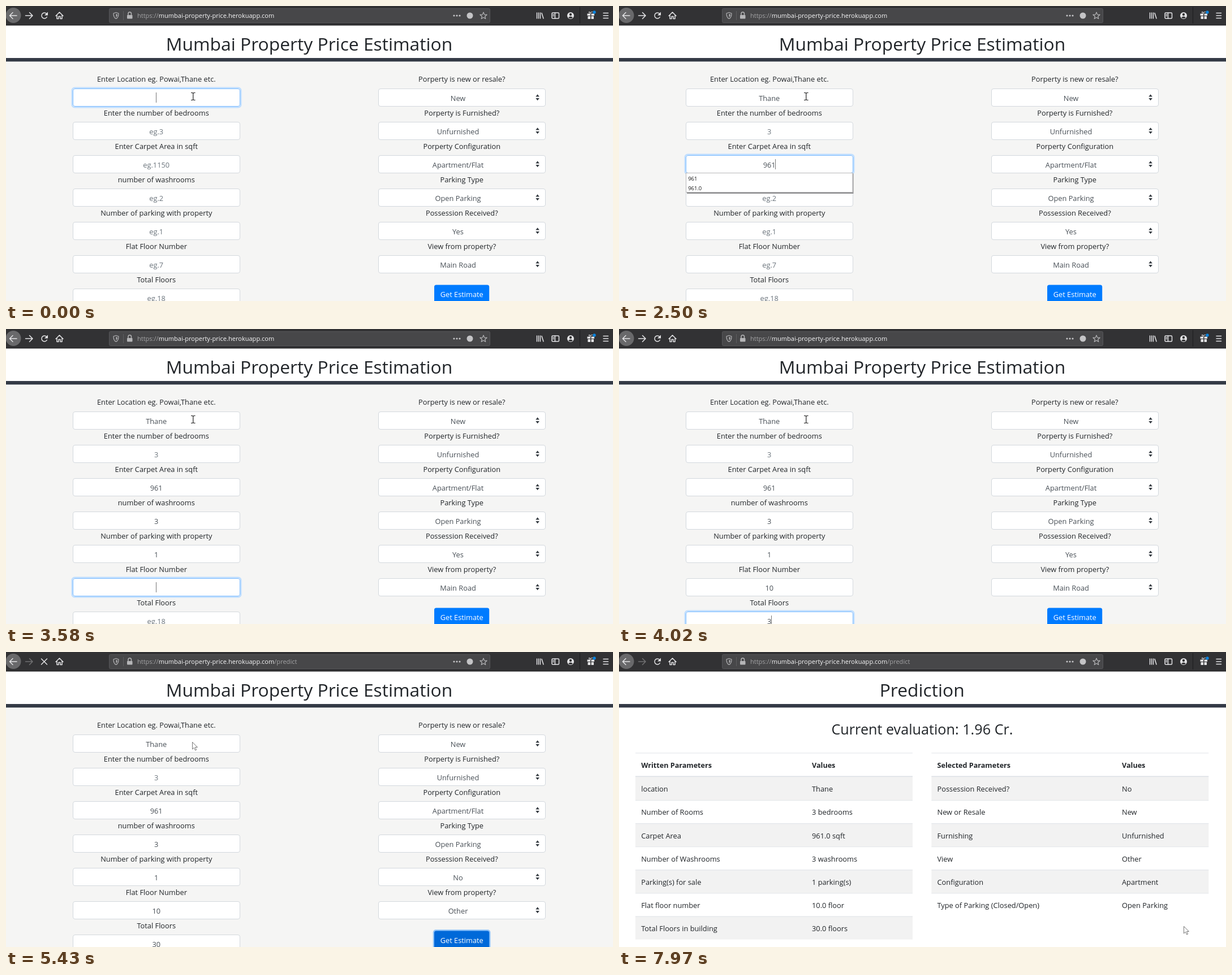
An HTML page that plays this animation: 1073 by 522 pixels, repeating every 8 s.

```html
<!DOCTYPE html>
<html lang="en">
<head>
<meta charset="utf-8">
<title>Property Price Estimation</title>
<style>
html, body { margin: 0; width: 100%; height: 100%; overflow: hidden; background: #fff; }
svg { display: block; width: 100%; height: 100%; }
text { font: 12.8px "Open Sans", "Noto Sans", sans-serif; fill: #212529; white-space: pre; }
.mid { text-anchor: middle; }
.h1 { font-size: 31.8px; }
.h2 { font-size: 25.2px; }
.th { font-size: 12.6px; font-weight: 700; }
.url { font-size: 11.05px; fill: #a4a4a6; }
.url .host { fill: #f9f9fa; }
.val { fill: #495057; }
.hint { fill: #6c757d; }
.item { font-size: 9.4px; fill: #111; }
.box { fill: #fff; stroke: #d3d8dd; }
.box.on { stroke: #80bdff; }
.ring { fill: none; stroke: #bfdeff; stroke-width: 2.6; }
.ico { fill: none; stroke: #e4e4e6; stroke-width: 1.5; stroke-linecap: round; stroke-linejoin: round; }
.dim { stroke: #b5b5b7; stroke-width: 1.2; }
.solid { fill: #e4e4e6; stroke: none; }
</style>
</head>
<body>
<svg id="stage" viewBox="0 0 1073 522" preserveAspectRatio="none">
  <g id="form"><rect y="98" width="1073" height="424" fill="#f5f5f4"/>
    <text class="h1 mid" x="536" y="79">Mumbai Property Price Estimation</text></g>
  <g id="result"><text class="h1 mid" x="535.7" y="79">Prediction</text>
    <text class="h2 mid" x="536" y="146">Current evaluation: 1.96 Cr.</text></g>
  <rect y="92" width="1073" height="6.3" fill="#343a46"/>

  <rect width="1073" height="34" fill="#323234"/>
  <rect y="33.500" width="1073" height="1" fill="#161618"/>
  <rect x="182.5" y="4.5" width="673" height="25" rx="2" fill="#474749" stroke="#57575a"/>
  <circle cx="13" cy="16.5" r="13.5" fill="#69696b"/>
  <path class="ico" d="M19 17H7M12 11.5L6.5 17l5.500 5.500"/>
  <path id="forward" class="ico" d="M34.500 17H46.500M41.500 11.500L47 17l-5.500 5.500"/>
  <g id="reload"><path class="ico" d="M72.300 19.500A5 5 0 1 1 71.500 13.500"/><path class="solid" d="M74 10.500v6h-6z"/></g>
  <path id="stop" class="ico" d="M62.500 12l10 10M72.500 12l-10 10"/>
  <path class="ico" d="M88 17.500L94.500 11l6.500 6.500M90 16.500v6h3v-4h3v4h3v-6"/>
  <path class="ico dim" d="M194.500 11.500l4.500 1.500c0 5-1 8-4.500 9.500c-3.500-1.500-4.500-4.500-4.500-9.500z"/>
  <path d="M194.500 14v6c1.500-1 2.300-3 2.400-5.300z" fill="#b5b5b7"/>
  <path d="M207.500 9v16" stroke="#5e5e60"/>
  <rect x="214" y="16" width="9.500" height="6.500" rx="1" fill="#b5b5b7"/>
  <path class="ico" style="stroke:#b5b5b7" d="M216 16v-2.500a2.700 2.700 0 0 1 5.500 0v2.500"/>
  <text class="url" x="232" y="21">https://<tspan class="host">mumbai-property-price.herokuapp.com</tspan><tspan id="path">/predict</tspan></text>
  <g fill="#c4c4c6"><circle cx="792" cy="17" r="1.600"/><circle cx="797" cy="17" r="1.600"/><circle cx="802" cy="17" r="1.600"/><circle cx="820" cy="17" r="5.500"/></g>
  <path id="star" class="ico dim"/>
  <path class="ico" d="M938.500 12v10M941.500 12v10M944.500 12v10M947 12.500l3 9.500"/>
  <rect class="ico" x="965" y="12" width="12.500" height="10" rx="1.500"/>
  <path class="ico" d="M970.500 12v10M967 15h1.500M967 17.500h1.500"/>
  <circle cx="998" cy="17" r="6" fill="#e4e4e6"/>
  <circle cx="998" cy="15" r="2.200" fill="#323234"/><path d="M994 20.500q4-4 8 0q-4 3-8 0z" fill="#323234"/>
  <path d="M1014.500 2v29" stroke="#1c1c1e"/>
  <path class="solid" d="M1027.500 13.500h5.500v3.500h-5.500zM1034.500 13.500h5.500v3.500h-5.500zM1028.500 18h4.500v5h-4.500zM1034.500 18h4.500v5h-4.500z"/>
  <path class="ico dim" d="M1033.500 13q-4-1-3-2.500q2-1 3 2.500q1-3.500 3-2.500"/>
  <circle cx="1040" cy="11" r="2.700" fill="#0a84e0"/>
  <path class="ico" d="M1056 12.500h8.500M1056 17h8.500M1056 21.500h8.500"/>

  <path id="beam" d="M327 153.500h2.500l1.300 1l1.300-1h2.500M330.800 154.500v11M327 166.500h2.500l1.300-1l1.300 1h2.500" fill="none" stroke="#222" stroke-width="1.200"/>
  <path id="arrow" d="M.500.500v12.500l2.900-2.700 2.200 4.700 2-.900-2.100-4.600h3.900z" fill="#fff" stroke="#555" stroke-width=".8"/>
</svg>
<script>
const LOOP = 8000, PITCH = 59, BOX_H = 31;
const $ = id => document.getElementById(id);
const form = $('form'), result = $('result');

function add(parent, tag, attrs, content) {
  const el = document.createElementNS('http://www.w3.org/2000/svg', tag);
  for (const k in attrs) el.setAttribute(k, attrs[k]);
  if (content) el.textContent = content;
  return parent.appendChild(el);
}
const show = (el, on) => { el.style.display = on ? '' : 'none'; };
const label = (parent, x, y, s, cls = '') => add(parent, 'text', { x, y, class: cls }, s);

// Form
const inputs = [
  ['Enter Location eg. Powai,Thane etc.', ''],
  ['Enter the number of bedrooms', 'eg.3'],
  ['Enter Carpet Area in sqft', 'eg.1150'],
  ['number of washrooms', 'eg.2'],
  ['Number of parking with property', 'eg.1'],
  ['Flat Floor Number', 'eg.7'],
  ['Total Floors', 'eg.18']
];
const selects = [
  ['Porperty is new or resale?', 'New'],
  ['Porperty is Furnished?', 'Unfurnished'],
  ['Porperty Configuration', 'Apartment/Flat'],
  ['Parking Type', 'Open Parking'],
  ['Possession Received?', 'Yes'],
  ['View from property?', 'Main Road']
];
const BUTTON = inputs.length + selects.length;

function field(x, row, name, textX) {
  const y = 146.5 + row * PITCH;
  label(form, x + 147.3, 134.4 + row * 59.1, name, 'mid');
  const ring = add(form, 'rect', { class: 'ring', x: x - 1.7, y: y - 1.7, width: 298.4, height: BOX_H + 3.4, rx: 4.5 });
  const box = add(form, 'rect', { class: 'box', x, y, width: 295, height: BOX_H, rx: 3.5 });
  return { y, ring, box, text: label(form, textX, y + 21.2, '', 'mid val') };
}
const fields = [
  ...inputs.map(([name], i) => field(118.5, i, name, 265.7)),
  ...selects.map(([name], i) => {
    const f = field(658.5, i, name, 799);
    add(form, 'path', { d: `M936.3 ${f.y + 14}h6.600l-3.300-4.200zM936.3 ${f.y + 16.6}h6.600l-3.300 4.200z`, fill: '#343a40' });
    return f;
  })
];
const buttonRing = add(form, 'rect', { x: 754.8, y: 491.2, width: 101.6, height: 38, rx: 5, fill: '#8dc2fa' });
const button = add(form, 'rect', { x: 757, y: 493.6, width: 97.2, height: 33, rx: 3.5 });
label(form, 805.7, 515, 'Get Estimate', 'mid').style.fill = '#fff';
const caret = add(form, 'path', { stroke: '#777' });
const menu = add(form, 'g', {});

// Result tables
function table(x, col, head, rows) {
  const line = (y, h) => add(result, 'rect', { x, y, width: 490, height: h, fill: '#dee2e6' });
  const pair = (y, cells, cls) => {
    label(result, x + 10.2, y, cells[0], cls);
    label(result, col, y, cells[1], cls);
  };
  rows.forEach((cells, i) => {
    const y = 221 + i * 41.1;
    if (i % 2 === 0) add(result, 'rect', { x, y, width: 490, height: 41.1, fill: '#f2f2f2' });
    if (i) line(y, 0.9);
    pair(247.4 + i * 41.07, cells);
  });
  line(178.4, 0.9);
  line(219.4, 1.7);
  pair(205, [head, 'Values'], 'th');
}
table(29, 341, 'Written Parameters', [
  ['location', 'Thane'], ['Number of Rooms', '3 bedrooms'], ['Carpet Area', '961.0 sqft'],
  ['Number of Washrooms', '3 washrooms'], ['Parking(s) for sale', '1 parking(s)'],
  ['Flat floor number', '10.0 floor'], ['Total Floors in building', '30.0 floors']
]);
table(552.3, 889, 'Selected Parameters', [
  ['Possession Received?', 'No'], ['New or Resale', 'New'], ['Furnishing', 'Unfurnished'],
  ['View', 'Other'], ['Configuration', 'Apartment'], ['Type of Parking (Closed/Open)', 'Open Parking']
]);

$('star').setAttribute('d', 'M' + Array.from({ length: 10 }, (_, i) => {
  const a = i * Math.PI / 5, r = i % 2 ? 2.8 : 6.4;
  return `${(844 + r * Math.sin(a)).toFixed(2)} ${(17.4 - r * Math.cos(a)).toFixed(2)}`;
}).join('L') + 'z');

// Timeline: each step changes the state at its time
const steps = [];
const at = (t, change) => steps.push([t, change]);
const type = (t, i, s, list) => at(t, st => {
  st.vals[i] = s;
  st.caret = true;
  if (list) st.list = list;
});
// The border moves first, the glow follows after the lag
const tab = (t, i, lag = 0) => {
  at(t, st => { st.focus = i; st.list = []; st.caret = true; });
  at(t + lag, st => { st.ring = i; });
};
const move = (t, x, y) => at(t, st => { st.mouse = [x, y]; });

at(240, st => { st.caret = false; });
type(470, 0, 'T');
type(560, 0, 'T', ['Thane', 'Thane West']);
type(790, 0, 'Th');
type(870, 0, 'Tha');
type(1020, 0, 'Than');
type(1170, 0, 'Thane');
tab(1510, 1);
type(1730, 1, '3', ['3', '3.0', '32']);
tab(1960, 2, 70);
type(2200, 2, '9', ['961', '961.0']);
type(2350, 2, '96');
type(2500, 2, '961');
tab(2740, 3, 80);
type(2960, 3, '3', ['3', '3.0']);
tab(3120, 4, 80);
type(3350, 4, '1', ['1', '1.0']);
tab(3500, 5, 80);
type(3720, 5, '1', ['10', '10.0']);
type(3800, 5, '10');
tab(3870, 6, 80);
type(4020, 6, '3');
type(4110, 6, '30');
[4250, 4330, 4410, 4490, 4560].forEach((t, i) => tab(t, 7 + i));
type(4640, 11, 'No');
tab(4720, 12);
type(4890, 12, 'Other');
tab(4960, BUTTON);
at(5180, st => { st.loading = true; });
at(5430, st => { st.sent = true; });
at(5500, st => { st.done = true; });
at(6130, st => { st.loading = false; });
move(7050, 405, 186);
move(7130, 495, 216);
move(7200, 573, 241);
move(7420, 682, 322);
move(7500, 789, 400);
move(7730, 872, 438);
move(7810, 938, 463);
move(7890, 980, 479);
move(7970, 998, 485);
steps.sort((a, b) => a[0] - b[0]);

function draw(st) {
  fields.forEach((f, i) => {
    const isInput = i < inputs.length, active = st.focus === i, val = st.vals[i];
    show(f.ring, st.ring === i);
    f.box.classList.toggle('on', active || st.ring === i);
    f.text.textContent = val || (active ? '' : inputs[i][1]);
    const pale = isInput && (!val || (i === 1 && !active));
    f.text.setAttribute('class', pale ? 'mid hint' : 'mid val');
  });
  const pressed = st.focus === BUTTON;
  show(buttonRing, pressed);
  button.setAttribute('fill', pressed ? '#0069d9' : '#007bff');

  const f = fields[st.focus];
  const typing = st.focus < inputs.length;
  show(caret, typing && st.caret);
  menu.textContent = '';
  if (typing && !st.done) {
    const x = Math.round(265.2 + f.text.getComputedTextLength() / 2) + 0.5;
    caret.setAttribute('d', `M${x} ${f.y + 6.5}v18`);
    if (st.list.length) {
      const y = f.y + BOX_H, h = st.list.length * 17 + 1;
      add(menu, 'rect', { x: 120, y: y + 1, width: 294.5, height: h + 0.5, fill: '#8c8c8e' });
      add(menu, 'rect', { x: 118.5, y, width: 294.5, height: h - 1, fill: '#fff', stroke: '#b8b8ba' });
      st.list.forEach((s, i) => label(menu, 122.2, y + 13 + i * 17, s, 'item'));
    }
  }

  show(form, !st.done);
  show(result, st.done);
  show($('path'), st.sent);
  show($('stop'), st.loading);
  show($('reload'), !st.loading);
  show($('beam'), !st.sent);
  show($('arrow'), st.sent);
  $('forward').style.opacity = st.sent ? 0.35 : 1;
  $('arrow').setAttribute('transform', `translate(${st.mouse})`);
}

let last = -1;
const start = performance.now();
function tick() {
  const t = (performance.now() - start) % LOOP;
  const n = steps.filter(s => s[0] <= t).length;
  if (n !== last) {
    last = n;
    const st = {
      vals: [...inputs.map(() => ''), ...selects.map(s => s[1])],
      focus: 0, ring: 0, caret: true, list: [],
      loading: false, sent: false, done: false, mouse: [329, 159]
    };
    steps.slice(0, n).forEach(s => s[1](st));
    draw(st);
  }
  requestAnimationFrame(tick);
}
tick();
</script>
</body>
</html>
```
